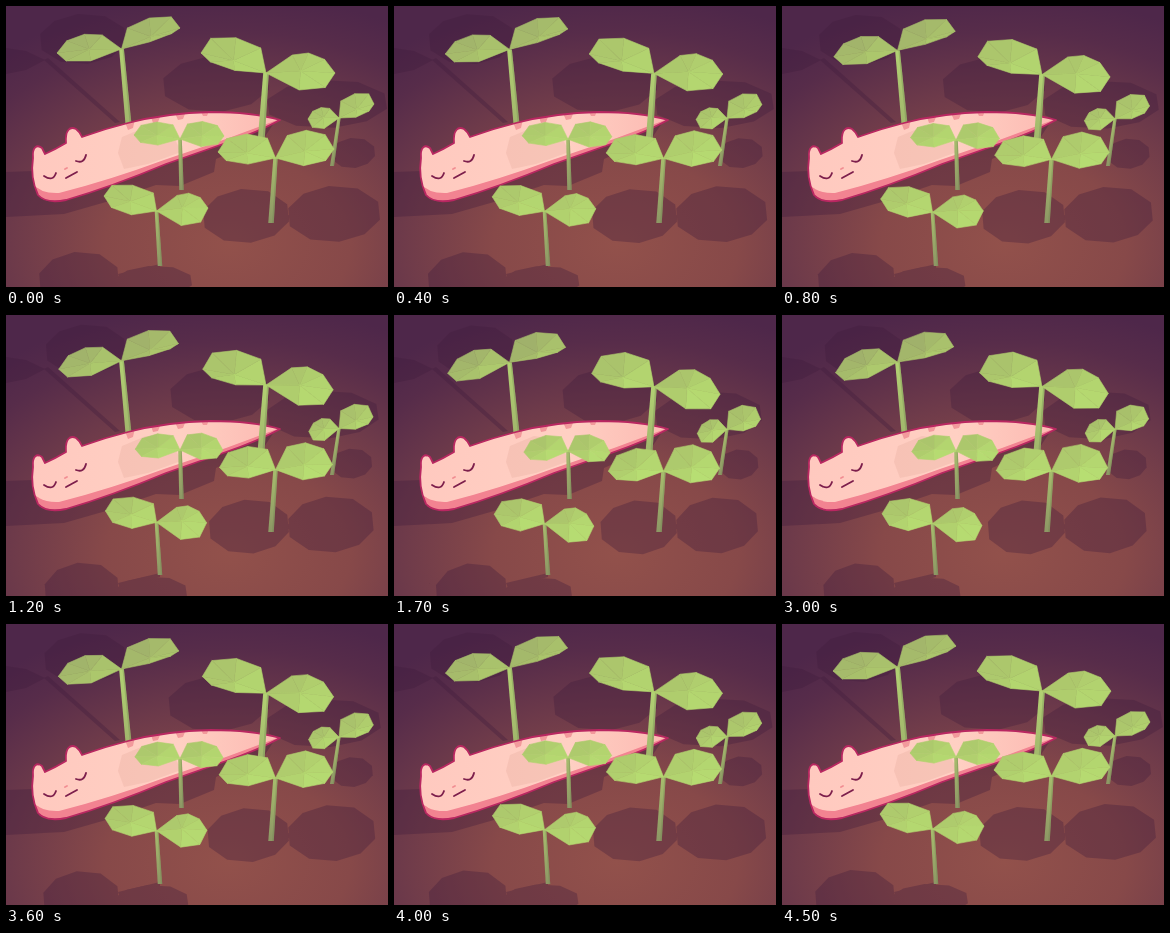
These frames come from a looping animation (382 by 281 pixels, 4.6 s). An HTML page:

```html
<!DOCTYPE html>
<html lang="en">
<head>
<meta charset="utf-8">
<title>Sleeping among sprouts</title>
<style>
html, body { margin: 0; width: 100%; height: 100%; overflow: hidden; background: #55304b; }
svg { display: block; width: 100vw; height: 100vh; }
</style>
</head>
<body>
<svg viewBox="0 0 382 281">
  <defs>
    <radialGradient id="soil" gradientUnits="userSpaceOnUse" cx="0" cy="0" r="1"
      gradientTransform="translate(222 238) scale(350 250)">
      <stop offset="0" stop-color="#92514b"/>
      <stop offset=".35" stop-color="#874949"/>
      <stop offset=".62" stop-color="#6d3a4a"/>
      <stop offset=".85" stop-color="#572c4a"/>
      <stop offset="1" stop-color="#4e274a"/>
    </radialGradient>
    <linearGradient id="skin" x1="0" x2="1">
      <stop offset="0" stop-color="#ffc9bf"/>
      <stop offset=".6" stop-color="#ffd0c3"/>
      <stop offset="1" stop-color="#fcb9b2"/>
    </linearGradient>
    <linearGradient id="stalk" x2="0" y2="1">
      <stop offset="0" stop-color="#b2d173"/>
      <stop offset="1" stop-color="#a1b66c"/>
    </linearGradient>
    <linearGradient id="dusk" x2="0" y2="1">
      <stop offset="0" stop-color="#a7bd6d"/>
      <stop offset="1" stop-color="#8d9765"/>
    </linearGradient>
    <path id="body" d="M27 152C26 141 31 138 36 142L39 148Q50 143 60 137C59 124 64 120 70 123Q74 126 76 131Q98 123 122 117Q160 107 205 106Q246 106 274 114Q252 126 220 137L160 158Q105 181 60 194Q40 198 32 189Q24 172 27 152Z"/>
    <clipPath id="inside"><use href="#body"/></clipPath>
  </defs>
  <rect width="382" height="281" fill="url(#soil)"/>
  <g id="shade" fill="#401c3c" opacity=".34">
    <path d="M0 166L28 165L100 150L270 114L258 132L210 153L208 166L174 180L150 179L100 196L58 208L0 211Z"/>
    <path d="M0 42L20 45L39 54L20 64L0 68ZM38 54L42 52L114 116L109 117Z"/>
    <path d="M265 213L283 209L283 214L265 217ZM154 258L112 268L114 273L154 262Z"/>
  </g>
  <g id="back"></g>
  <use href="#body" fill="url(#skin)"/>
  <g clip-path="url(#inside)">
    <path d="M24 174Q32 188 53 187Q104 174 158 154L220 133L274 113V150L60 204H20Z" fill="#f28391"/>
    <path d="M112 147L116 131L140 121L165 125L175 146L142 158L118 163Z" fill="#dfa294" opacity=".26"/>
    <path d="M119 116L129 113L127 122L122 124ZM144 108L156 106L152 116L147 117ZM168 105L181 103L177 113L172 114ZM193 102L204 102L201 110L197 110Z" fill="#f29a9c"/>
  </g>
  <use href="#body" fill="none" stroke="#b92761" stroke-width="1.8" stroke-linejoin="round"/>
  <g fill="none" stroke="#7d1f4c" stroke-width="1.8" stroke-linecap="round">
    <path d="M38 170Q47 176 50 167M70 155Q78 158 80 149M60 172L71 166"/>
    <path d="M59 163L61 162" stroke="#f18d92"/>
  </g>
  <g id="front"></g>
</svg>
<script>
const LOOP = 4600, STEP = 100, LIGHT = .9;
const get = id => document.getElementById(id);
const draws = [];

function add(parent, attrs = {}) {
  const el = document.createElementNS("http://www.w3.org/2000/svg", "polygon");
  for (const key in attrs) el.setAttribute(key, attrs[key]);
  parent.append(el);
  return pts => el.setAttribute("points", pts.map(p => p.map(v => v.toFixed(2)).join()).join(" "));
}

// A rough blob that pulls in towards its plant's shadow centre as the leaf droops.
function shadow(hubX, hubY, dx, dy, rx, ry) {
  const show = add(get("shade"));
  draws.push(k => show(Array.from({ length: 10 }, (_, i) => {
    const a = i * Math.PI / 5 + .2, rough = 1.02 + .04 * Math.sin(i * 5);
    return [
      hubX + (dx + rx * rough * Math.cos(a)) * (1 - .13 * k),
      hubY + dy + ry * rough * Math.sin(a) + 3 * k
    ];
  })));
}

// Outline in leaf space: u runs from base to tip, v is the height across.
function outline(up, low, shoulder) {
  return [
    [0, 0],
    [shoulder, -.9 * up], [(shoulder + .85) / 2, -up], [.85, -.68 * up],
    [1, 0],
    [.86, .85 * low], [.48, low]
  ];
}

function leaf(parent, tone, baseAt, [tipX, tipY, up, low, shoulder]) {
  const shape = outline(up, low, shoulder);
  const reach = tipX - baseAt(0)[0], size = Math.abs(reach);
  const group = parent.appendChild(document.createElementNS("http://www.w3.org/2000/svg", "g"));
  const facets = shape.map(() => add(group, { "stroke-width": .6, "stroke-linejoin": "round" }));

  draws.push(k => {
    const [x, y] = baseAt(k);
    const ax = tipX - .05 * reach * k - x, ay = tipY + .21 * size * k - y;
    const place = ([u, v]) => [x + ax * u, y + ay * u + v * (1 + .1 * k)];
    const pts = shape.map(place), hub = place([.5, -.1 * up]);

    facets.forEach((show, i) => {
      const p = pts[i], q = pts[(i + 1) % pts.length];
      const facing = Math.atan2((p[1] + q[1]) / 2 - hub[1], (p[0] + q[0]) / 2 - hub[0]);
      const t = tone + (.3 + .2 * k) * Math.cos(facing - LIGHT);
      const color = `hsl(${79 + 4 * t} ${50 + 18 * t}% ${62 + 6 * t}%)`;
      show([hub, p, q]);
      group.children[i].setAttribute("fill", color);
      group.children[i].setAttribute("stroke", color);
    });
  });
}

function plant({ layer = "front", tone, fill = "dusk", top, foot, width, leaves }) {
  const parent = get(layer), w = width / 2;
  const span = Math.abs(leaves[0][0] - leaves[1][0]) / 2;
  const baseAt = k => [top[0], top[1] + .085 * span * k];
  const strip = (k, from) => {
    const [x, y] = baseAt(k), [fx, fy] = foot;
    return [[x + from * w * .8, y], [x + w * .8, y], [fx + w, fy], [fx + from * w, fy]];
  };
  const stem = add(parent, { fill: `url(#${fill})` });
  const edge = add(parent, { fill: "#6b7a4e", opacity: .3 });
  draws.push(k => { stem(strip(k, -1)); edge(strip(k, .4)); });
  leaves.forEach(spec => leaf(parent, tone, baseAt, spec));
}

shadow(117, 45, -40, -12, 43, 25);
shadow(261, 97, -51, -19, 53, 28);
shadow(261, 97, 60, 1, 60, 24);
shadow(326, 150, 21, -3, 22, 15);
shadow(282, 211, -42, -1, 43, 27);
shadow(282, 211, 46, -3, 46, 28);
shadow(113, 268, -40, 5, 40, 27);
shadow(113, 268, 34, 8, 39, 16);

// Each leaf: tip x, tip y, rise above the midrib, depth below it, shoulder position.
plant({
  layer: "back", tone: -.6, fill: "stalk", top: [115.5, 43], foot: [122.5, 118], width: 6,
  leaves: [[51, 47, 17, 10, .3], [174, 22, 21, 3, .1]]
});
plant({
  tone: -.1, top: [333, 112], foot: [326, 160], width: 4,
  leaves: [[368, 98, 18, 6, .05], [302, 113, 11, 10, .3]]
});
plant({
  tone: 0, fill: "stalk", top: [260, 67], foot: [255, 137], width: 7,
  leaves: [[195, 47, 26, 7, .08], [329, 67, 20, 17, .38]]
});
plant({
  tone: .2, top: [269.5, 152], foot: [265, 217], width: 5.5,
  leaves: [[212, 146, 21, 9, .14], [328, 143, 23, 12, .2]]
});
plant({
  tone: .1, top: [174, 133], foot: [175.5, 184], width: 4.5,
  leaves: [[128, 129, 15, 8, .15], [218, 130, 16, 9, .17]]
});
plant({
  tone: .1, top: [150.5, 205], foot: [154, 260], width: 4.5,
  leaves: [[98, 190, 19, 11, .06], [202, 202, 16, 16, .4]]
});

let last = -1;
function tick() {
  const t = Math.floor(performance.now() % LOOP / STEP) * STEP;
  if (t !== last) {
    const droop = (1 - Math.cos(2 * Math.PI * t / LOOP)) / 2;
    draws.forEach(draw => draw(droop));
    last = t;
  }
  requestAnimationFrame(tick);
}
tick();
</script>
</body>
</html>
```
